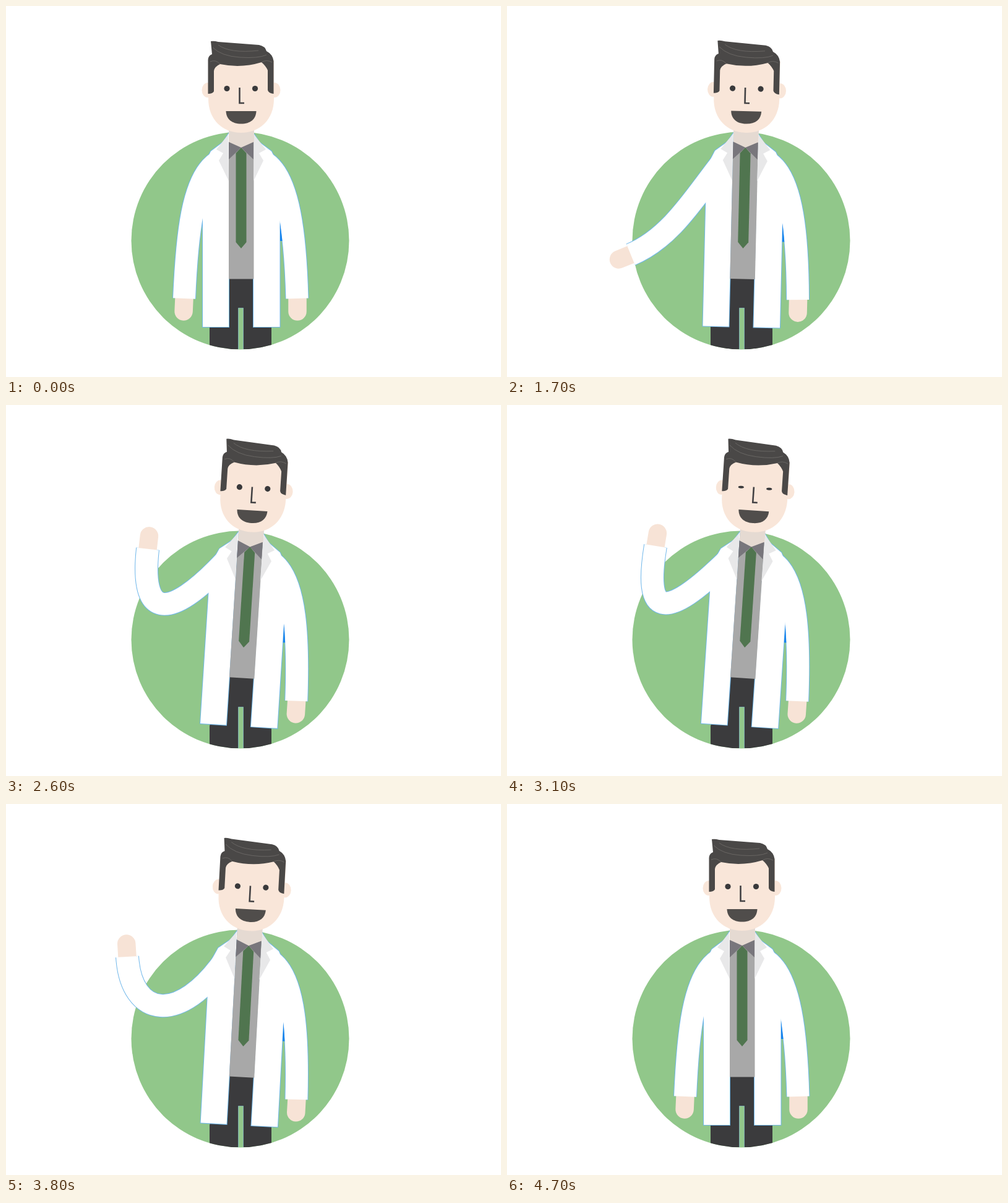
Animation, 800 px wide and 600 px high, one loop 6.5 s. Source, as an HTML page:

```html
<!DOCTYPE html>
<html lang="en">
<head>
<meta charset="utf-8">
<title>Waving doctor</title>
<style>
html, body { margin: 0; width: 100%; height: 100%; overflow: hidden; background: #fff }
svg { display: block; width: 100vw; height: 100vh }
.line { fill: none }
.edge { stroke: #70b7ea; stroke-width: 38 }
.sleeve { stroke: #fff; stroke-width: 36 }
.hand { stroke: #f7e3d6; stroke-width: 29.5; stroke-linecap: round }
</style>
</head>
<body>
<svg viewBox="0 0 800 600">
  <defs>
    <circle id="disc" cx="378.5" cy="379.5" r="176"/>
    <clipPath id="inDisc"><use href="#disc"/></clipPath>
    <path id="coat" d="M360 206L351 220L331 235L318 262V519H360ZM400 206L409 220L429 235L442.500 262V519H400Z"/>
    <path id="right" class="line" d="M415 251C459 273 468 380 470.500 473"/>
    <path id="lapel" d="M359 208L340 232L351 238L344 250L360 283Z"/>
    <path id="collar" d="M360 220L380 229L360 248Z"/>
    <ellipse id="ear" cx="326" cy="136" rx="9.500" ry="12"/>
  </defs>
  <use href="#disc" fill="#91c78a"/>
  <g clip-path="url(#inDisc)">
    <path d="M329 519L358 436H402L429 519V555H329Z" fill="#3b3b3d"/>
    <path d="M375.500 555V488.500H383.500V555" fill="#92c78b" stroke="#84b8c4" stroke-width=".8"/>
  </g>

  <path class="line edge arm"/>
  <g class="tilt">
    <use href="#coat" stroke="#70b7ea" stroke-width="2"/>
    <use href="#right" class="edge"/>
    <path class="line hand" d="M471 473V494"/>
  </g>
  <path class="line hand" id="hand"/>
  <path class="line sleeve arm"/>

  <g class="tilt">
    <use href="#right" class="sleeve"/>
    <path d="M443 350L446.500 380H443Z" fill="#1683ee"/>
    <use href="#coat" fill="#fff"/>
    <path d="M360 220H400.500V441.500H360Z" fill="#a8a8a8"/>
    <path d="M360 195H401V220L380 229L360 220Z" fill="#e5dad2"/>
    <g fill="#78767c">
      <use href="#collar"/>
      <use href="#collar" transform="matrix(-1 0 0 1 760 0)"/>
    </g>
    <g fill="#e8e8e9">
      <use href="#lapel"/>
      <use href="#lapel" transform="matrix(-1 0 0 1 760 0)"/>
    </g>
    <path d="M380 229L388.500 238V382L380 392L371.500 382V238Z" fill="#50754f"/>

    <g fill="#f9e6d9">
      <use href="#ear"/>
      <use href="#ear" transform="matrix(-1 0 0 1 760 0)"/>
      <path d="M327 88V150C327 184 350 205 380 205S433 184 433 150V88Z"/>
    </g>
    <path d="M326.500 142V87Q327 80 333 78L331 57Q336 56 343 58L409 63Q419 65 421 73Q431 78 432.500 89V142Q424 141 423 136V104Q420 97 413 91Q380 101 346 94Q337 98 336 105V138Q334 142 326.500 142Z" fill="#4a4847"/>
    <path d="M334 67Q348 81 378 83T421 79M343 63Q362 77 408 72M330 90Q339 86 346 94M430 91Q421 86 413 91" fill="none" stroke="#6c6966" stroke-width=".9"/>
    <g fill="#39393b">
      <ellipse class="eye" cx="357" cy="133.500" rx="4.600"/>
      <ellipse class="eye" cx="402.500" cy="133.500" rx="4.600"/>
    </g>
    <path d="M377.500 132V157H385" fill="none" stroke="#434244" stroke-width="2.600"/>
    <path d="M355.500 170H404.500C404 183 395 190.500 380 190.500S356 183 355.500 170Z" fill="#504d4b"/>
  </g>
</svg>
<script>
// Four arm poses: body tilt in degrees, two curve controls, wrist
const poses = [
  [0,    300, 273, 292, 380, 288, 473], // hanging
  [1.35, 306, 305, 266, 375, 200, 402], // stretched out
  [3.1,  281, 359, 202, 345, 196, 247], // waving, open
  [3.8,  250, 356, 222, 338, 240, 228]  // waving, bent
];
// Time and lift, where a lift of 1.5 is halfway from the second pose to the third
const keys = [[0, 0], [1200, 0], [1300, .24], [1700, 1], [2000, 2], [2200, 2.42],
  [2900, 3], [3100, 3], [3800, 2], [4000, 1.95], [4700, 0], [6500, 0]];
const mix = (a, b, k) => a + (b - a) * k;
const set = (q, name, value) =>
  document.querySelectorAll(q).forEach(e => e.setAttribute(name, value));

function liftAt(t) {
  const i = keys.findIndex(k => k[0] > t);
  const [t0, a] = keys[i - 1], [t1, b] = keys[i];
  return mix(a, b, (t - t0) / (t1 - t0));
}

function draw() {
  const t = Math.floor(performance.now() % 6500 / 100) * 100;
  const lift = liftAt(t), n = Math.min(2, Math.floor(lift));
  const [tilt, x1, y1, x2, y2, x, y] =
    poses[n].map((v, j) => mix(v, poses[n + 1][j], lift - n));
  const sway = Math.sin(tilt * Math.PI / 180);
  const reach = 21 / Math.hypot(x - x2, y - y2);

  // The shoulder follows the tilting body
  set('.arm', 'd', `M${345 + 204 * sway} ${251 - 35 * sway}C${x1} ${y1} ${x2} ${y2} ${x} ${y}`);
  set('#hand', 'd', `M${x} ${y}l${(x - x2) * reach} ${(y - y2) * reach}`);
  set('.tilt', 'transform', `rotate(${tilt} 380 455)`);
  set('.eye', 'ry', Math.min(4.6, 2 + Math.abs(t - 3100) / 60));
  requestAnimationFrame(draw);
}
draw();
</script>
</body>
</html>
```
